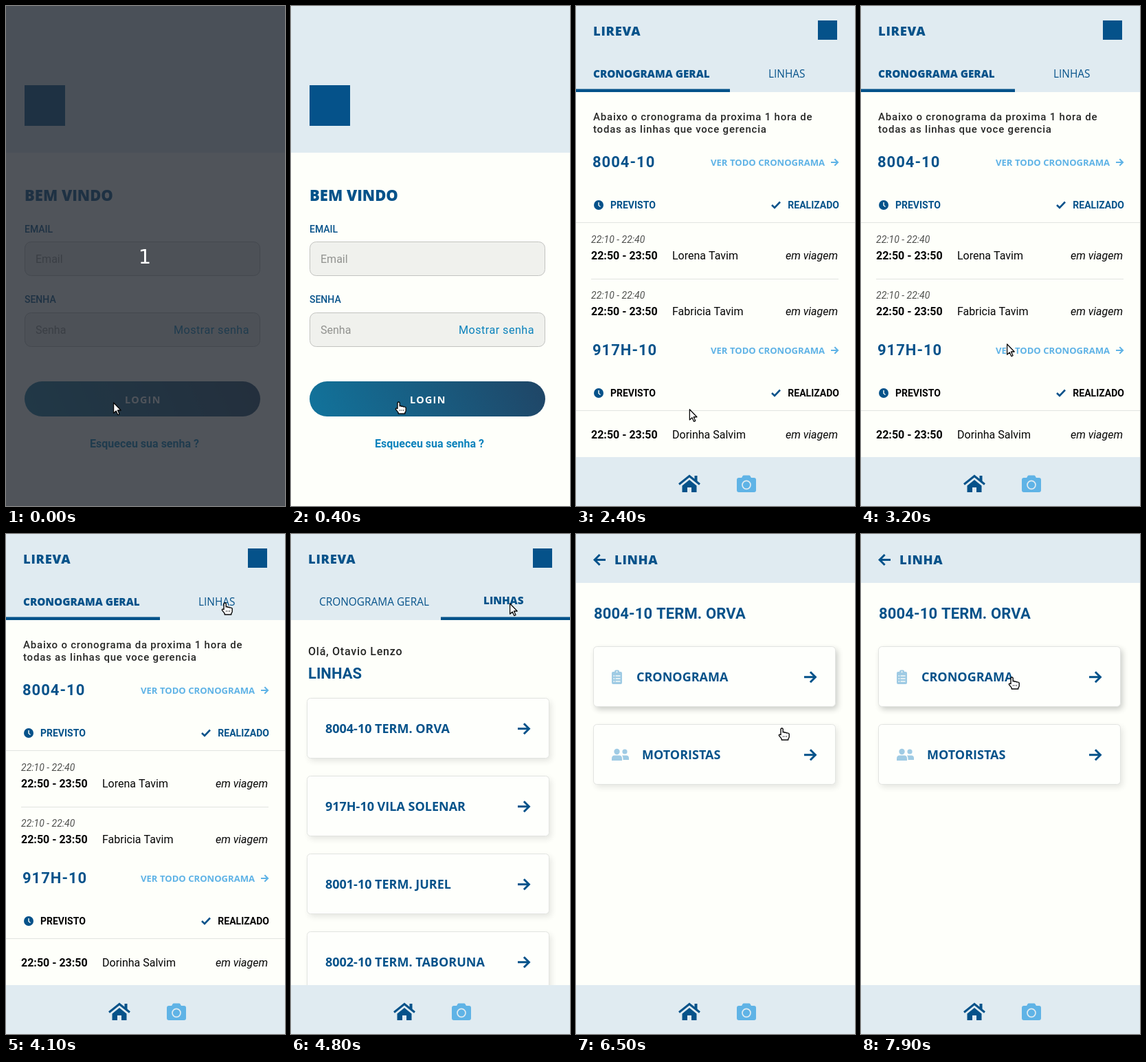
Animation, 406 px wide and 726 px high, one loop 8 s. Source, as an HTML page with a canvas:

```html
<!DOCTYPE html>
<html lang="pt">
<head>
<meta charset="utf-8">
<title>Cronograma</title>
<style>
html, body { margin: 0; width: 100%; height: 100%; overflow: hidden; background: #fefffa; }
canvas { display: block; width: 406px; height: 726px; }
</style>
</head>
<body>
<canvas id="stage"></canvas>
<script>
const W = 406, H = 726, LOOP = 8000, STEP = 100;
const canvas = document.getElementById('stage');
const ratio = window.devicePixelRatio || 1;
canvas.width = W * ratio;
canvas.height = H * ratio;
const c = canvas.getContext('2d');

const PAPER = '#fefffa', BAR = '#e0ebf1', NAVY = '#05528a', SKY = '#5fb3e6', LINK = '#0b82bc',
      PALE = '#9fcbe4', RULE = '#e2e4e1', INK = '#050505', SOFT = '#262725';
const sans = (size, weight = 700) => `${weight} ${size}px "Open Sans", "Noto Sans", sans-serif`;
const robo = (size, weight = 400) => `${weight} ${size}px Roboto, sans-serif`;

function text(str, x, y, font, color, gap = 0, align = 'left') {
  c.font = font;
  c.fillStyle = color;
  c.letterSpacing = gap + 'px';
  c.textAlign = align;
  c.fillText(str, x, y);
}

function rect(x, y, w, h, color) {
  c.fillStyle = color;
  c.fillRect(x, y, w, h);
}

function roundBox(x, y, w, h, r, fill, stroke) {
  c.beginPath();
  c.roundRect(x, y, w, h, r);
  c.fillStyle = fill;
  c.fill();
  if (stroke) line(null, stroke, 1);
}

// Strokes the given points, or the current path when there are none.
function line(points, color, width) {
  if (points) {
    c.beginPath();
    points.forEach(([x, y]) => c.lineTo(x, y));
  }
  c.strokeStyle = color;
  c.lineWidth = width;
  c.stroke();
}

function disc(x, y, r, color) {
  c.beginPath();
  c.arc(x, y, r, 0, 7);
  c.fillStyle = color;
  c.fill();
}

function shape(d, x, y, fill, stroke, width) {
  const path = new Path2D(d);
  c.save();
  c.translate(x, y);
  c.lineJoin = 'round';
  if (fill) {
    c.fillStyle = fill;
    c.fill(path);
  }
  if (stroke) {
    c.strokeStyle = stroke;
    c.lineWidth = width;
    c.stroke(path);
  }
  c.restore();
}

// Arrow pointing from tail to tip along y; the mitre ends at the tip.
function arrow(tail, tip, y, color, head, width) {
  const dir = Math.sign(tip - tail);
  const end = tip - dir * width * .7, back = end - dir * head;
  line([[tail, y], [end, y]], color, width);
  line([[back, y - head], [end, y], [back, y + head]], color, width);
}

function footer() {
  rect(0, 655, W, 71, BAR);
  line([[150, 694.5], [165, 682.5], [180, 694.5]], NAVY, 3);
  rect(172.5, 682, 4, 8, NAVY);
  shape('M165 688L175.5 696.5V706H168V699H162V706H154.5V696.5Z', 0, 0, NAVY);
  roundBox(234, 685, 28, 21, 3, SKY);
  shape('M240.5 686L242.5 682.5Q243 681.5 244 681.5H252Q253 681.5 253.5 682.5L255.5 686Z', 0, 0, SKY);
  c.beginPath();
  c.arc(248, 695.3, 6, 0, 7);
  line(null, BAR, 1.7);
}

function login() {
  rect(0, 0, W, 213, BAR);
  rect(27, 115, 59, 59, NAVY);
  text('BEM VINDO', 27, 283, sans(22, 800), NAVY);
  [['EMAIL', 'Email', 329], ['SENHA', 'Senha', 431.5]].forEach(([label, hint, y]) => {
    const top = Math.round(y + 13) + .5;
    text(label, 27, Math.floor(y), robo(14, 500), NAVY);
    roundBox(27.5, top, 342, 49, 9, '#f0f1ed', '#c2c3c0');
    text(hint, 43, top + 30.5, robo(16), '#91928f');
  });
  text('Mostrar senha', 244, 476, robo(16.2), LINK, .45);
  const g = c.createLinearGradient(60, 640, 340, 510);
  g.addColorStop(0, '#12729a');
  g.addColorStop(1, '#1f4768');
  roundBox(27, 545, 343, 51, 25.5, g);
  text('LOGIN', 173, 577, sans(14.4), '#fcfdfc', 1.3);
  text('Esqueceu sua senha ?', 201.5, 641, robo(16, 700), LINK, 0, 'center');
}

function tabs(second) {
  rect(0, 0, W, 125, BAR);
  text('LIREVA', 25, 43, sans(18.4, 800), NAVY, .7);
  rect(352, 21, 28, 28, NAVY);
  const on = sans(15.25, 800), off = sans(15.4, 400);
  text('CRONOGRAMA GERAL', second ? 41 : 25, 104, second ? off : on, NAVY);
  text('LINHAS', 280, second ? 102 : 104, second ? on : off, NAVY);
  rect(second ? 218 : 0, 120.5, second ? 188 : 224, 4.5, NAVY);
}

function group(code, y, color) {
  text(code, 24, y + 7, robo(22, 700), NAVY, 1);
  text('VER TODO CRONOGRAMA', 196, y + 5, sans(13.1), SKY);
  arrow(371, 382.5, y, SKY, 4.8, 2);
  disc(33, y + 62, 7, NAVY);
  line([[33, y + 58], [33, y + 62.5], [35.5, y + 64.5]], PAPER, 1.4);
  text('PREVISTO', 50, y + 67, robo(14, 700), color);
  line([[285, y + 62], [289, y + 66], [297, y + 57.5]], NAVY, 2.6);
  text('REALIZADO', 383, y + 67, robo(14, 700), color, 0, 'right');
  line([[0, y + 87.5], [W, y + 87.5]], RULE, 1);
}

function trip(name, y, late) {
  if (late) text('22:10 - 22:40', 22, y - 24, 'italic ' + robo(14), '#50514f');
  text('22:50 - 23:50', 22, y, robo(16, 700), INK);
  text(name, 140, y, robo(16), INK);
  text('em viagem', 381, y, 'italic ' + robo(16), INK, 0, 'right');
}

function schedule() {
  tabs(false);
  text('Abaixo o cronograma da proxima 1 hora de', 25, 166, robo(15, 500), SOFT, .78);
  text('todas as linhas que voce gerencia', 25, 184, robo(15, 500), SOFT, .78);
  group('8004-10', 227, NAVY);
  trip('Lorena Tavim', 368, true);
  line([[22, 396.5], [382, 396.5]], RULE, 1);
  trip('Fabricia Tavim', 449, true);
  group('917H-10', 500, INK);
  trip('Dorinha Salvim', 628, false);
  footer();
}

function card(x, y, label, indent, depth) {
  c.save();
  c.shadowColor = `rgba(40,45,40,${depth})`;
  c.shadowOffsetX = 3 * ratio;
  c.shadowOffsetY = 4 * ratio;
  c.shadowBlur = 9 * ratio;
  roundBox(x + .5, y + .5, 352, 87, 5, '#fefffc');
  c.restore();
  roundBox(x + .5, y + .5, 352, 87, 5, '#fefffc', RULE);
  text(label, x + indent, y + 51, sans(18), NAVY);
  arrow(x + 307, x + 325.5, y + 44.7, NAVY, 7.5, 3);
}

const stops = ['8004-10 TERM. ORVA', '917H-10 VILA SOLENAR', '8001-10 TERM. JUREL', '8002-10 TERM. TABORUNA'];

function lines() {
  tabs(true);
  text('Olá, Otavio Lenzo', 25, 176, robo(16, 500), SOFT, .75);
  text('LINHAS', 25, 210, robo(22, 700), NAVY);
  stops.forEach((name, i) => card(23, 238 + 113 * i, name, 27, .12));
  footer();
}

function lineMenu() {
  rect(0, 0, W, 71, BAR);
  arrow(43, 25, 37.5, NAVY, 7.5, 3);
  text('LINHA', 56, 44, sans(18.4, 800), NAVY, .7);
  text(stops[0], 26, 123, robo(22, 700), NAVY, .15);
  card(25, 163, 'CRONOGRAMA', 63, .25);
  card(25, 276, 'MOTORISTAS', 71, .12);
  roundBox(52, 200, 15, 18, 2, PALE);
  roundBox(56, 197.5, 7, 5, 2, PALE);
  disc(59.5, 200.3, 1, PAPER);
  [206, 210, 214].forEach(y => {
    rect(54.5, y - .7, 1.6, 1.5, PAPER);
    rect(57.5, y - .7, 7, 1.4, PAPER);
  });
  disc(59.5, 316, 4.2, PALE);
  disc(71, 316, 3.6, PALE);
  shape('M52 329V326Q52 321.5 56 321.5H63Q67 321.5 67 326V329Z', 0, 0, PALE);
  shape('M68.5 328V326Q68.5 323 67 321.5H73Q77 321.5 77 325.5V328Z', 0, 0, PALE);
  footer();
}

const POINTER = 'M.6 1V16.2L4.2 12.9L6.8 18.6L9 17.6L6.5 12H11.2Z';
const HAND = 'M-1 8V1.2Q.6-1.1 2.2 1.2V6Q3.8 5 4.9 6.5Q6.5 5.6 7.8 7.1Q9.6 6.4 11.2 8.2V12.5Q11.2 14 9.8 15.2V17H.2V15.4L-3.6 10.6Q-3.8 8.2-1 9.6Z';

// Pointer path: time, x, y
const path = [
  [0, 156, 575], [2300, 156, 575], [2700, 191, 614], [3100, 191, 614],
  [3200, 212, 490], [3300, 232, 420], [3500, 278, 290], [3700, 322, 170], [3800, 325, 130],
  [3900, 321, 108], [4000, 318, 100], [4800, 318, 100], [5000, 322, 130], [5300, 312, 230],
  [5600, 295, 281], [5700, 296, 282], [5800, 299, 282], [6700, 299, 282],
  [6800, 280, 266], [6900, 230, 228], [7000, 160, 185], [7100, 103, 150], [7200, 111, 134],
  [7300, 165, 128], [7400, 221, 135], [7500, 221, 135], [7600, 221, 141], [7700, 221, 141],
  [7800, 213, 176], [7900, 219, 208], [8000, 219, 208]
];
const handTimes = [[400, 1000], [4100, 4800], [5600, 7100], [7600, 8000]];

function cursor(t) {
  const i = path.findIndex(p => p[0] > t);
  const [t0, x0, y0] = path[i - 1], [t1, x1, y1] = path[i];
  const k = (t - t0) / (t1 - t0);
  const x = x0 + (x1 - x0) * k, y = y0 + (y1 - y0) * k;
  if (handTimes.some(([a, b]) => t >= a && t < b)) {
    shape(HAND, x, y, '#fff', '#080808', 1.4);
    shape('M2.5 11V13M5 11V13M7.5 11V13', x, y, null, '#222', .8);
  } else {
    shape(POINTER, x, y, '#fff', '#080808', 1.3);
  }
}

function draw(now) {
  const t = Math.floor(now % LOOP / STEP) * STEP;
  c.setTransform(ratio, 0, 0, ratio, 0, 0);
  rect(0, 0, W, H, PAPER);
  if (t < 900) login();
  else if (t < 4800) schedule();
  else if (t < 6500) lines();
  else lineMenu();
  if (t < 400) {
    rect(0, 0, W, H, 'rgba(37,42,50,.8)');
    text('1', 202, 374, '29px "DejaVu Sans", sans-serif', '#fff', 0, 'center');
  }
  cursor(t);
}

const start = performance.now();
function tick() {
  draw(performance.now() - start);
  requestAnimationFrame(tick);
}
tick();
</script>
</body>
</html>
```
